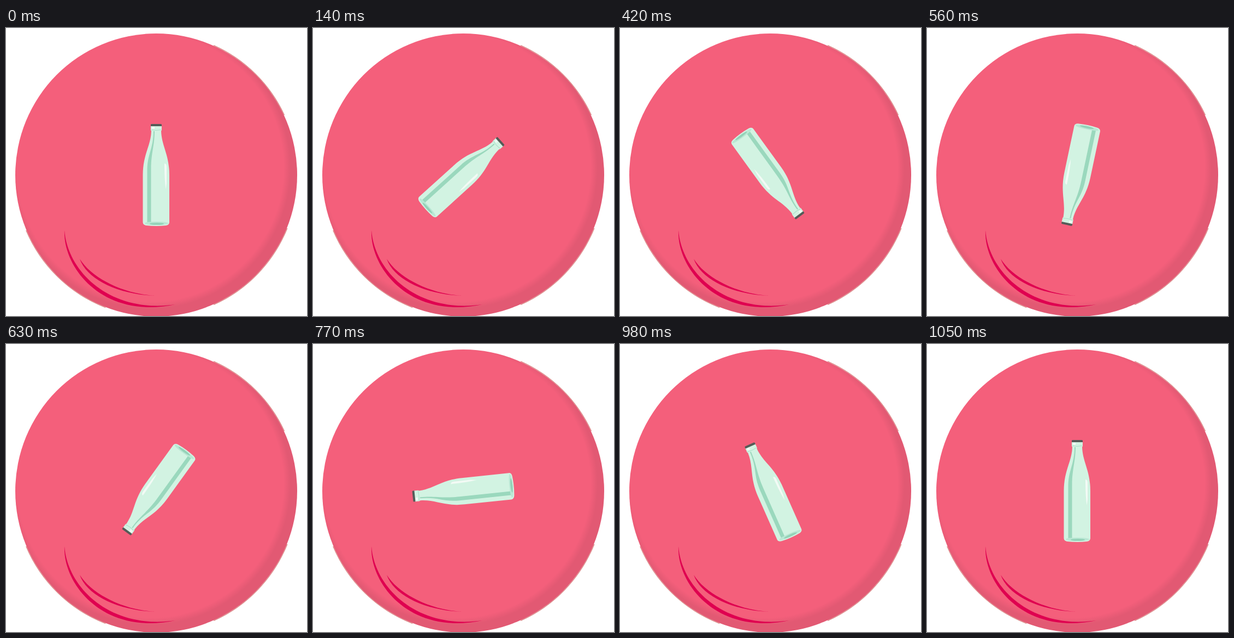
An HTML page for the animation above (1120 ms loop, 551 px wide and 525 px high).

```html
<!DOCTYPE html>
<html lang="en">
<head>
<meta charset="utf-8">
<title>Spinning bottle</title>
<style>
  html, body { margin: 0; width: 100%; height: 100%; overflow: hidden; background: #fff; }
  svg { display: block; }
</style>
</head>
<body>
<svg width="551" height="525" viewBox="0 0 551 525">
  <defs>
    <radialGradient id="face" gradientUnits="userSpaceOnUse" cx="264" cy="255" r="257">
      <stop offset=".95" stop-color="#f45f7b"/>
      <stop offset="1" stop-color="#e25973"/>
    </radialGradient>
  </defs>

  <!-- Disc with a thin worn rim on three sides -->
  <circle cx="275" cy="268" r="258.700" fill="none" stroke="#dc8a88" stroke-width="1.400"
          pathLength="360" stroke-dasharray="0 22 44 45 46 137 41 25"/>
  <circle cx="275" cy="268" r="258" fill="url(#face)"/>

  <g fill="#df0050">
    <path d="M107 369C104 436 176 532 310 504C193 521 113 446 107 369Z"/>
    <path d="M135 421C148 458 205 486 273 488C215 485 157 456 135 421Z"/>
  </g>

  <!-- Bottle, upright and centred on its pivot -->
  <g id="bottle">
    <path fill="#d2f3e2" d="M-10 -90H10V-82L9 -80C10 -52 24 -38 24 0V86Q24 91 18 92Q0 94 -18 92Q-24.500 91 -24.500 86V0C-24.500 -38 -10 -52 -9 -80L-10 -82Z"/>
    <path fill="#9ad8bd" d="M-5 -80H-3C-3 -52 -9.500 -42 -9.500 -8V86H-16.500V-8C-16.500 -38 -5 -48 -5 -80Z"/>
    <path fill="#b9e8d4" d="M-21 88Q-21 85 0 85T22 88Q22 91 0 91T-21 88Z"/>
    <ellipse cx="1" cy="89" rx="13" ry="2" fill="#94d2b8"/>
    <path fill="#f3faf5" d="M15 -21Q19 -21 19 -15V15L17.500 26Q15 10 15 -21Z"/>
    <path fill="none" stroke="#a9dfc9" d="M-9 -82.500Q0 -80.500 9 -82.500"/>
    <path fill="#f0faf4" d="M-8 -88H-3V-84H-8Z"/>
    <path fill="#555b58" d="M-10 -89V-92Q-10 -93 -8 -93H8Q10 -93 10 -92V-89Z"/>
  </g>
</svg>
<script>
  const STEP = 70, LOOP = 1120, TURN = 24;
  const bottle = document.getElementById('bottle');

  function draw(ms) {
    const step = Math.floor((ms % LOOP) / STEP);
    bottle.setAttribute('transform', `translate(275 268) rotate(${step * TURN})`);
  }

  let start;
  function tick(now) {
    start ??= now;
    draw(now - start);
    requestAnimationFrame(tick);
  }
  draw(0);
  requestAnimationFrame(tick);
</script>
</body>
</html>
```
